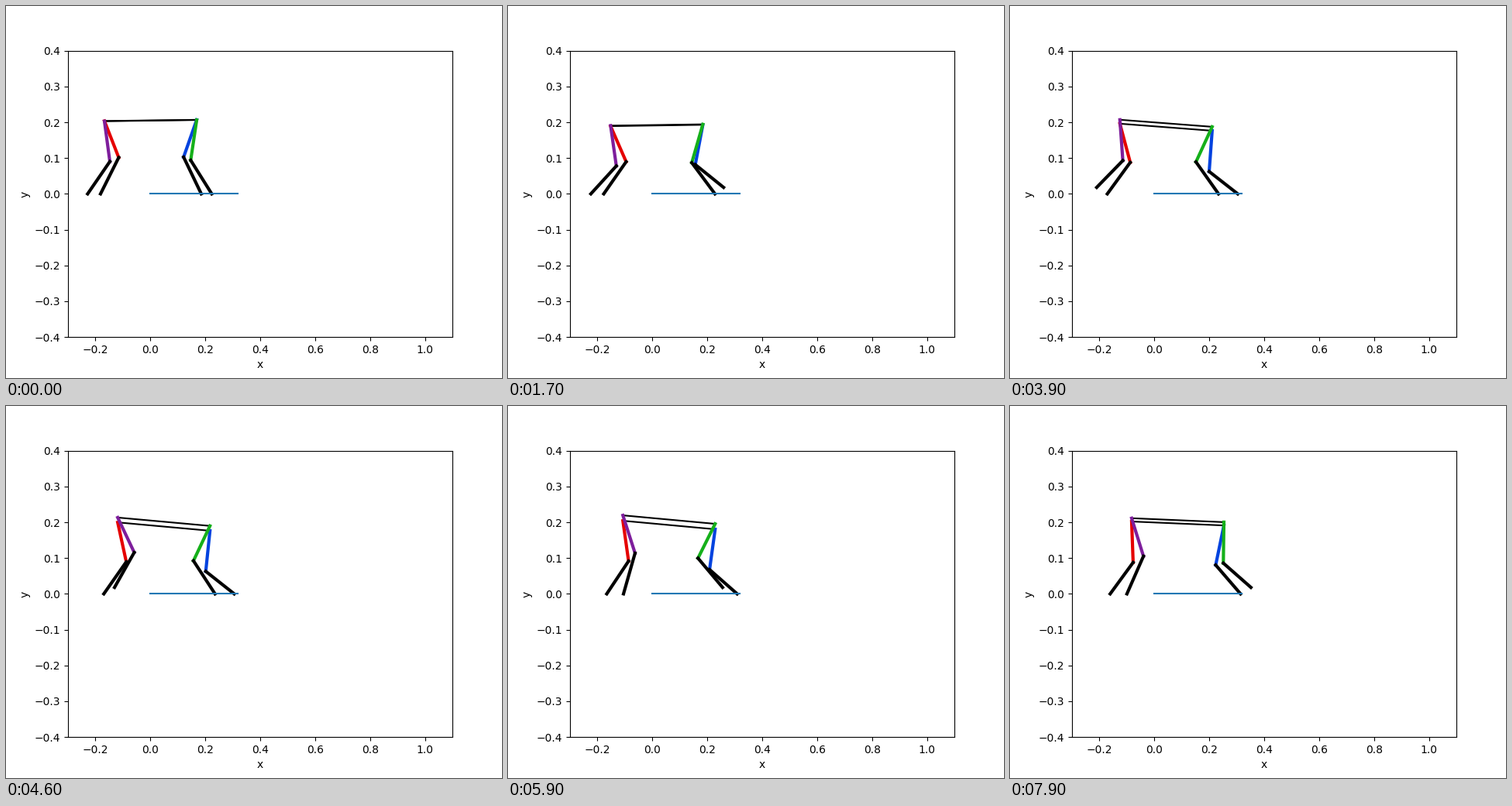
A matplotlib script for the animation above (8 s loop, 640 by 480 pixels).

```python
import numpy as np
import matplotlib.pyplot as plt
from matplotlib.animation import FuncAnimation

FRAMES, STEP_MS = 80, 100
BODY, THIGH, SHIN = 0.336, 0.1145, 0.1212
STRIDE, LIFT, DRIFT = 0.108, 0.018, 0.0026

# Hip heights of the far side at a few moments
KEY_T = np.array([0, 1.7, 3.0, 3.9, 5.3, 7.9])
REAR_Y = np.array([.2030, .1905, .2018, .2070, .2184, .2113])
FRONT_Y = np.array([.2063, .1942, .1896, .1873, .1936, .2003])

# Colour: (first foot x, swing start, swing duration, front leg, near side)
LEGS = {
    "red": (-.1815, 9.0, 1.6, False, True),
    "blue": (.1854, 0.84, 1.8, True, True),
    "purple": (-.2285, 3.68, 1.62, False, False),
    "green": (.2235, 5.2, 3.5, True, False),
}


def ease(u):
    u = np.clip(u, 0, 1)
    return u * u * (3 - 2 * u)


def spline(t, values):
    """Cubic Hermite curve through the height keys."""
    slopes = np.gradient(values, KEY_T)
    i = np.clip(np.searchsorted(KEY_T, t, side="right") - 1, 0, len(KEY_T) - 2)
    h = KEY_T[i + 1] - KEY_T[i]
    u = (t - KEY_T[i]) / h
    bend = slopes[i] * (1 - u) - slopes[i + 1] * u
    return values[i] + (values[i + 1] - values[i]) * ease(u) + h * u * (1 - u) * bend


def trunk_at(t):
    """Rear hip x, far-side rear and front heights, and drop of the near side."""
    surge = 0.0016 * (1 - np.cos(2 * np.pi * t / 3.9))
    x = -0.1673 + 0.0107 * t - surge
    drop = 0.0072 - 0.008 * np.cos(2 * np.pi * (t - 0.45) / 10.5)
    return x, spline(t, REAR_Y), spline(t, FRONT_Y), drop


def foot_at(t, x0, start, duration):
    """Drift on the ground; in the swing: lift, carry, lower."""
    u = (t - start) / duration
    x = x0 + DRIFT * t + STRIDE * ease(u / 0.8)
    y = LIFT * np.clip(min(u / 0.12, (1 - u) / 0.2), 0, 1)
    return np.array([x, y])


def knee_at(hip, foot, side):
    """Two-link inverse kinematics; side picks the way the knee bends."""
    d = foot - hip
    dist = np.hypot(*d)
    along = (THIGH**2 - SHIN**2 + dist**2) / (2 * dist)
    off = np.sqrt(max(THIGH**2 - along**2, 0))
    ux, uy = d / dist
    return hip + along * np.array([ux, uy]) + side * off * np.array([-uy, ux])


fig, ax = plt.subplots(figsize=(6.4, 4.8), dpi=100)
ax.set(xlim=(-0.3, 1.1), ylim=(-0.4, 0.4), xlabel="x", ylabel="y")


def new_line(color, width):
    return ax.plot([], [], color=color, lw=width)[0]


trunk = [new_line("black", 1.5) for _ in range(2)]
limbs = {name: (new_line("xkcd:" + name, 3), new_line("black", 3)) for name in LEGS}
ax.plot([0, 0.318], [0, 0], color="C0", lw=1.5)


def link(line, a, b):
    line.set_data([a[0], b[0]], [a[1], b[1]])


def update(frame):
    t = frame * STEP_MS / 1000
    x, rear, front, drop = trunk_at(t)
    for line, dy in zip(trunk, (0, drop)):
        link(line, (x, rear - dy), (x + BODY, front - dy))
    for name, (x0, start, duration, ahead, near) in LEGS.items():
        hip = np.array([x + BODY, front] if ahead else [x, rear])
        hip[1] -= drop * near
        foot = foot_at(t, x0, start, duration)
        knee = knee_at(hip, foot, -1 if ahead else 1)
        thigh, shin = limbs[name]
        link(thigh, hip, knee)
        link(shin, knee, foot)
    return trunk + [line for pair in limbs.values() for line in pair]


anim = FuncAnimation(fig, update, frames=FRAMES, interval=STEP_MS, repeat=True, repeat_delay=0)
plt.show()
```
